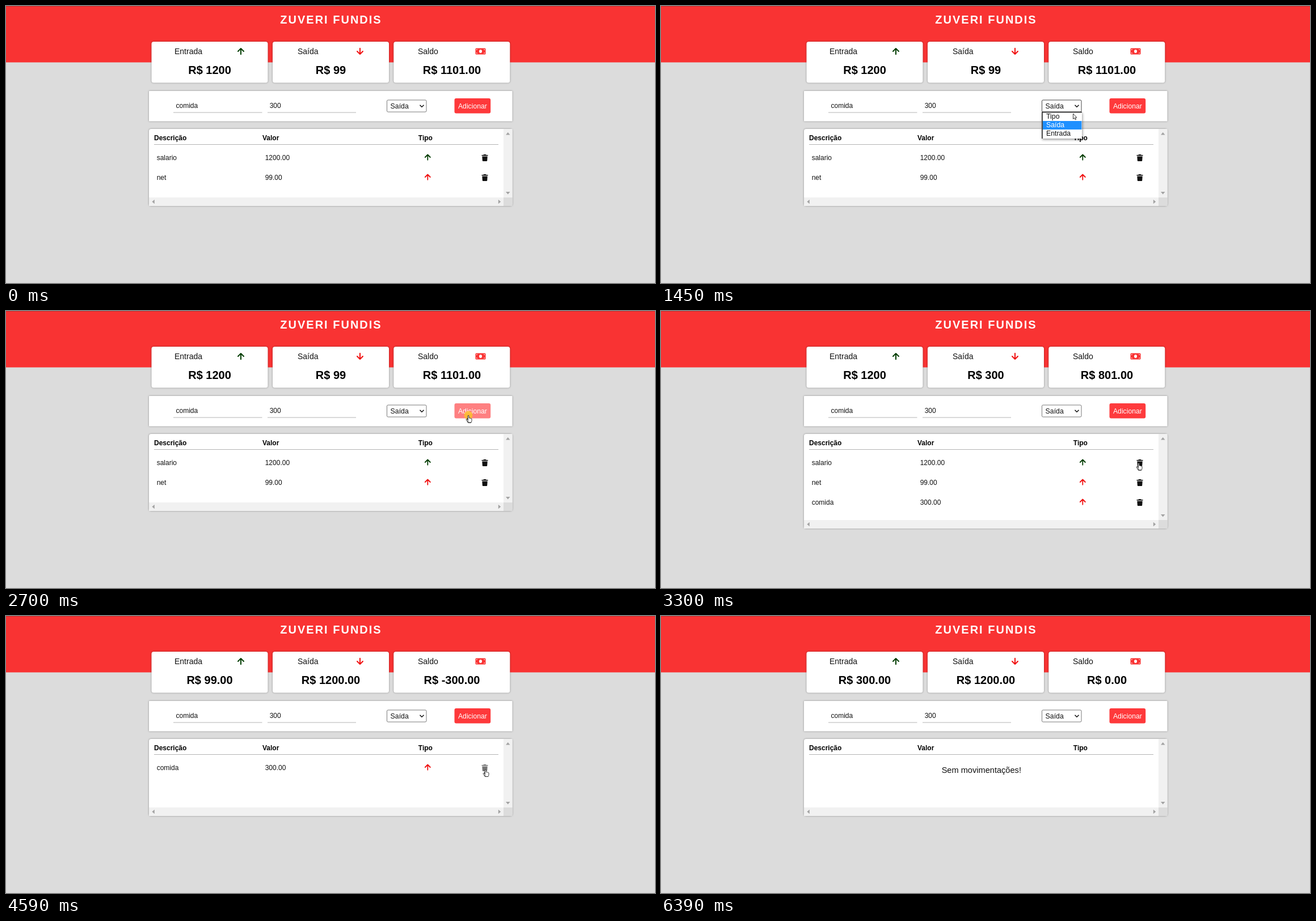
An HTML page that plays this animation: 1144x489 px, repeating every 6.74 s.

```html
<!DOCTYPE html>
<html lang="pt">
<head>
<meta charset="utf-8">
<title>Finanças</title>
<style>
  html, body { margin: 0; width: 100%; height: 100%; overflow: hidden; background: #dcdcdc; }
  svg { display: block; font: 12px "Liberation Sans", Arial, sans-serif; fill: #111; }
  .box { fill: #fff; filter: drop-shadow(0 0 1.6px rgba(0, 0, 0, .38)); }
  .title { font-size: 20px; font-weight: bold; letter-spacing: 2px; fill: #fff; }
  .label { font-size: 14px; }
  .total { font-size: 20px; font-weight: bold; fill: #000; text-anchor: middle; }
  .head { font-weight: bold; fill: #000; }
  .empty { font-size: 14.6px; text-anchor: middle; }
  .opt { font-size: 12.3px; }
  .bar { fill: #f1f1f1; }
  .tri { fill: #a3a3a3; }
  .line { stroke: #b4b4b4; }
  .arrow { fill: none; stroke-width: 2; stroke-linecap: round; stroke-linejoin: round; }
  .pointer { fill: #fff; stroke: #222; stroke-width: .9; stroke-linejoin: round; }
</style>
</head>
<body>
<svg width="1144" height="489" viewBox="0 0 1144 489">
  <defs>
    <path id="up" class="arrow" d="M0 5.2V-5M-5 0L0-5L5 0"/>
    <path id="bin" d="M-5.5-5H-2.6L-2-6H2L2.6-5H5.5V-3.4H-5.5ZM-4.7-2.6H4.7L4.2 5Q4.1 6 3.1 6H-3.1Q-4.1 6-4.2 5Z"/>
  </defs>

  <rect width="1144" height="489" fill="#dcdcdc"/>
  <rect width="1144" height="99.5" fill="#f93333"/>
  <rect width="1144" height="1" fill="#c22f2f"/>
  <text class="title" x="573" y="31" text-anchor="middle">ZUVERI FUNDIS</text>

  <rect class="box" x="256.5" y="63" width="205" height="72.5" rx="4"/>
  <rect class="box" x="470" y="63" width="205" height="72.5" rx="4"/>
  <rect class="box" x="683.3" y="63" width="205" height="72.5" rx="4"/>
  <g class="label">
    <text x="297" y="85">Entrada</text>
    <text x="514" y="85">Saída</text>
    <text x="726" y="85">Saldo</text>
  </g>
  <use href="#up" transform="translate(414 80)" stroke="#003c00"/>
  <use href="#up" transform="translate(624 80) rotate(180)" stroke="#f01010"/>
  <g transform="translate(836.5 80)">
    <rect x="-9" y="-5.5" width="18" height="11" rx="1.5" fill="#f93333"/>
    <ellipse rx="2.5" ry="3" fill="#fff"/>
    <path d="M-7.3-3.8h2l-2 2ZM7.3-3.8h-2l2 2ZM-7.3 3.8h2l-2-2ZM7.3 3.8h-2l2-2Z" fill="#fff"/>
  </g>
  <g class="total">
    <text id="in" x="359" y="120"></text>
    <text id="out" x="572.5" y="120"></text>
    <text id="sum" x="786" y="120"></text>
  </g>

  <rect class="box" x="252" y="150" width="640.5" height="53.5" rx="1"/>
  <text x="299.5" y="180">comida</text>
  <text x="464.7" y="180">300</text>
  <path class="line" d="M295 188H451.5M461 188H617"/>
  <rect id="select" x="671.5" y="166" width="69.5" height="21" rx="2" fill="#fff"/>
  <text class="opt" x="677.6" y="181">Saída</text>
  <path d="M729.5 174.8L733 178.3L736.5 174.8" fill="none" stroke="#111" stroke-width="1.5"/>
  <rect id="button" x="790.5" y="163" width="63.7" height="26.5" rx="3" fill="#fe393b"/>
  <text x="822.4" y="181" text-anchor="middle" fill="#fff" font-size="12.2">Adicionar</text>

  <rect id="panel" class="box" x="252" y="217" width="640.5" rx="4"/>
  <rect id="vbar" class="bar" x="877" y="217" width="15.5"/>
  <path class="tri" d="M881 227.5H888.5L884.7 223Z"/>
  <g id="foot">
    <rect class="bar" x="252" y="0" width="625" height="15"/>
    <rect x="877" y="0" width="15.5" height="15" fill="#dcdcdc"/>
    <path class="tri" d="M881-10H888.5L884.7-5.6ZM261.8 3.8V11.2L257.4 7.5ZM867.8 3.8V11.2L872.2 7.5Z"/>
  </g>
  <g class="head">
    <text x="261" y="237">Descrição</text>
    <text x="452" y="237">Valor</text>
    <text x="726.8" y="237">Tipo</text>
  </g>
  <path class="line" d="M261 244.5H868"/>
  <g id="rows"></g>

  <g id="menu">
    <rect x="671" y="187" width="71" height="47" fill="#fff" style="filter:drop-shadow(1px 2px 2px rgba(0,0,0,.4))"/>
    <path d="M672 234V187.5H742" fill="none" stroke="#222" stroke-width="1.6"/>
    <rect x="673" y="203" width="68.5" height="15" fill="#1e90ff"/>
    <g class="opt">
      <text x="679" y="199">Tipo</text>
      <text x="679" y="214" fill="#fff">Saída</text>
      <text x="679" y="229">Entrada</text>
    </g>
  </g>

  <g id="cursor">
    <circle id="flash" r="7.5" fill="#fbc02d" fill-opacity=".85"/>
    <path id="point" class="pointer" d="M.5.5V10L2.7 8L4.2 11.3L5.6 10.7L4.2 7.5H7Z"/>
    <path id="hand" class="pointer" d="M-1 1Q0-.4 1 1V5Q2 4.3 2.8 5.3Q3.8 4.8 4.4 5.8Q5.8 5.4 6 6.8V9.5Q6 11 4.8 13H-.5Q-2-.8-1 8.2ZM-1 8.2L-2.8 6.7Q-4.2 6.6-3.8 8Q-2 11-.5 13H4.8"/>
  </g>
</svg>
<script>
const LOOP = 6740;
const $ = id => document.getElementById(id);
const RED = '#f01010', GREEN = '#003c00';

const salary = ['salario', '1200.00', GREEN];
const net = ['net', '99.00', RED];
const food = ['comida', '300.00', RED];

// start time, three totals, listed entries
const states = [
  [0, '1200', '99', '1101.00', [salary, net]],
  [2770, '1200', '300', '801.00', [salary, net, food]],
  [3780, '1200', '1200.00', '-399.00', [['net', '99.00', '#a82408'], food]],
  [4460, '99.00', '1200.00', '-300.00', [food]],
  [4990, '300.00', '1200.00', '0.00', []]
];

// time, x, y of the pointer tip
const path = [
  [70, 941, 442], [230, 941, 442], [840, 728, 177], [1170, 728, 177],
  [1450, 726, 189.5], [1790, 721, 206], [1990, 721, 206], [2630, 815, 184],
  [3030, 815, 184], [3290, 842, 268], [3640, 845, 270.5], [5319, 845, 270.5],
  [5320, 828.5, 271], [5460, 798, 232], [5860, 691, 489],
  [6120, 1058, 483], [6250, 1072, 480], [6390, 1084, 489]
];
const clicks = [1170, 1990, 2700, 3710, 4390, 4920];

const within = (t, a, b) => t >= a && t < b;
const ramp = (t, a, b) => Math.min(1, Math.max(0, (t - a) / (b - a)));
const smooth = p => p * p * (3 - 2 * p);
const show = (id, on) => $(id).setAttribute('visibility', on ? 'visible' : 'hidden');

function rowMarkup([name, value, color], i) {
  const y = 267 + i * 35;
  return `<text x="265.7" y="${y + 4.5}">${name}</text>
    <text x="456.7" y="${y + 4.5}">${value}</text>
    <use href="#up" transform="translate(743.3 ${y}) scale(.9)" stroke="${color}"/>
    <use href="#bin" class="bin" transform="translate(844 ${y + 1})"/>`;
}

function showState([, income, spent, balance, rows]) {
  $('in').textContent = 'R$ ' + income;
  $('out').textContent = 'R$ ' + spent;
  $('sum').textContent = 'R$ ' + balance;
  $('rows').innerHTML = rows.map(rowMarkup).join('') ||
    '<text class="empty" x="564.8" y="277">Sem movimentações!</text>';
  const height = rows.length > 2 ? 167 : 136;
  $('panel').setAttribute('height', height);
  $('vbar').setAttribute('height', height - 15);
  $('foot').setAttribute('transform', `translate(0 ${217 + height - 15})`);
}

function moveCursor(t) {
  const i = Math.max(1, path.findIndex(k => k[0] > t));
  const [a, b] = [path[i - 1], path[i]];
  const p = smooth(ramp(t, a[0], b[0]));
  const x = a[1] + (b[1] - a[1]) * p, y = a[2] + (b[2] - a[2]) * p;
  $('cursor').setAttribute('transform', `translate(${x} ${y})`);
}

let shown;
function draw(now) {
  const t = now % LOOP;
  const state = states.filter(s => s[0] <= t).pop();
  if (state !== shown) showState(shown = state);

  const visible = within(t, 70, 5860) || within(t, 6120, 6390);
  const hand = within(t, 2480, 3080) || within(t, 3230, 4990);
  if (visible) moveCursor(t);
  show('point', visible && !hand);
  show('hand', visible && hand);
  show('flash', clicks.some(c => within(t, c, c + 70)));
  show('menu', within(t, 1170, 1990));

  $('select').setAttribute('stroke', within(t, 800, 2100) ? '#444' : '#7a7a7a');
  const hover = ramp(t, 2400, 2630) - ramp(t, 3030, 3310);
  $('button').setAttribute('opacity', 1 - .36 * hover);
  const bin = document.querySelector('.bin');
  if (bin) bin.setAttribute('opacity', 1 - .42 * ramp(t, 3300, 3640));
}

const start = performance.now();
function tick() {
  draw(performance.now() - start);
  requestAnimationFrame(tick);
}
tick();
</script>
</body>
</html>
```
